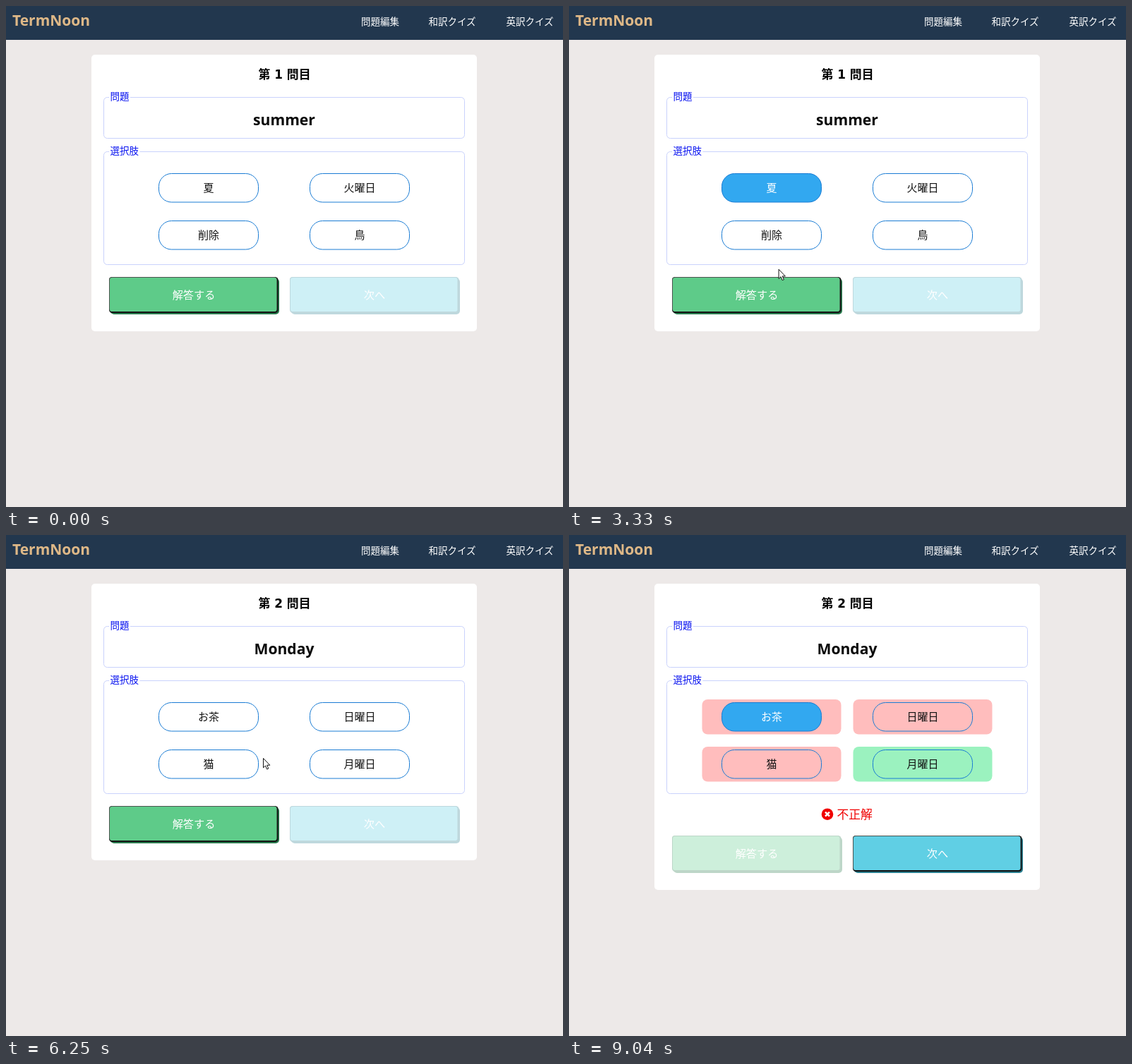
An HTML page that plays this animation: 789x710 px, repeating every 9.51 s.

```html
<!DOCTYPE html>
<html lang="ja">
<head>
<meta charset="utf-8">
<title>Quiz</title>
<style>
html, body { margin: 0; width: 100%; height: 100%; overflow: hidden; background: #ede9e8; }
svg { display: block; }
text { font-family: "Noto Sans CJK JP", "Noto Sans CJK", "Noto Sans", sans-serif; }
.mid { text-anchor: middle; }
.latin { font-family: "Noto Sans", "Open Sans", sans-serif; font-weight: 700; }
.head { font-family: "DejaVu Sans", "Noto Sans CJK JP", "Noto Sans CJK", sans-serif; font-weight: 700; }
.ink { fill: #fff; stroke: #111; stroke-linejoin: round; }
</style>
</head>
<body>
<svg id="stage" width="789" height="710" viewBox="0 0 789 710"></svg>
<script>
const LOOP = 9510;
const stage = document.getElementById('stage');

function el(parent, tag, attrs = {}, text) {
  const node = document.createElementNS('http://www.w3.org/2000/svg', tag);
  set(node, attrs);
  if (text) node.textContent = text;
  return parent.appendChild(node);
}
function set(node, attrs) {
  for (const key in attrs) node.setAttribute(key, attrs[key]);
}
function rect(parent, x, y, width, height, rx, fill, stroke = 'none') {
  return el(parent, 'rect', { x, y, width, height, rx, fill, stroke });
}
function label(parent, x, y, size, fill, text, cls = '') {
  return el(parent, 'text', { x, y, 'font-size': size, fill, class: cls }, text);
}
function show(node, on) {
  node.setAttribute('display', on ? 'inline' : 'none');
}
const clamp = v => Math.max(0, Math.min(1, v));
const ease = u => u * u * (3 - 2 * u);

// Page frame
rect(stage, 0, 0, 789, 48, 0, '#22374e');
label(stage, 9, 28, 21, '#deb887', 'TermNoon', 'latin');
label(stage, 503, 27, 13.5, '#fff', '問題編集');
label(stage, 598.5, 27, 13.5, '#fff', '和訳クイズ');
label(stage, 708.5, 27, 13.5, '#fff', '英訳クイズ');

const card = rect(stage, 121, 69, 546, 392, 5, '#fff');
const heading = label(stage, 394.5, 103.4, 16.9, '#000', '', 'head mid');

function fieldset(y, height, legend) {
  rect(stage, 138.5, y + 0.5, 511, height, 5, 'none', '#c9d2fc');
  rect(stage, 146, y - 1, legend.length * 13.5 + 3, 3, 0, '#fff');
  label(stage, 147.5, y + 4, 13.5, '#0a14f0', legend);
}
fieldset(129, 58, '問題');
fieldset(206, 160, '選択肢');
const word = label(stage, 394, 169, 21.1, '#0a0a0a', '', 'latin mid');

// Options, drawn around their own centres
const options = [0, 1, 2, 3].map(i => {
  const group = el(stage, 'g');
  return {
    x: 287 + 214 * (i % 2),
    y: 257.5 + 67 * (i >> 1),
    group,
    box: rect(group, -98.5, -24.5, 197, 49.5, 8),
    pill: rect(group, -70.5, -20, 141, 40.5, 18, 'none', '#1a7cd4'),
    text: label(group, 0, 5.1, 15, '#111', '', 'mid')
  };
});

// Result messages
function message(color, text, x, mark) {
  const group = el(stage, 'g');
  el(group, 'circle', { cx: 366, cy: 395.7, r: 8.3, fill: color });
  el(group, 'path', { d: mark, fill: 'none', stroke: '#fff', 'stroke-width': 2.5 });
  label(group, x, 401.5, 16.8, color, text);
  return group;
}
const right = message('#008000', '正解!!!', 378.5, 'M361.3 396l3.3 3.3 6.2-6.2');
const wrong = message('#f00000', '不正解', 379.5, 'M363 392.7l6 6m0-6l-6 6');

// Bevelled buttons
function button(x, text, fill, shade) {
  const group = el(stage, 'g');
  rect(group, -118.5, -24, 239, 51, 5, shade);
  const edge = rect(group, -120.5, -26, 239.5, 51, 4.5);
  const light = rect(group, -120.5, -26, 237.5, 49, 4);
  rect(group, -119.5, -25, 236.5, 48, 3, fill);
  label(group, -0.5, 4.7, 15.2, '#fff', text, 'mid');
  return { x, group, edge, light, shade };
}
const answerBtn = button(266.5, '解答する', '#5ecb89', '#287a4d');
const nextBtn = button(522.5, '次へ', '#60cfe4', '#2a7f90');

function drawButton(b, y, enabled, p) {
  const hover = enabled && Math.abs(p.x - b.x) < 120 && Math.abs(p.y - y) < 26;
  b.edge.setAttribute('fill', enabled ? '#111' : b.shade);
  b.light.setAttribute('fill', enabled ? '#4c5450' : b.shade);
  set(b.group, {
    opacity: enabled ? 1 : 0.3,
    transform: `translate(${b.x} ${y}) scale(${hover ? 0.96 : 1})`
  });
}

// Pointers, with the hot spot at the origin
const arrow = el(stage, 'path', {
  class: 'ink', d: 'M.5.5V13.8L3.5 11 5.6 15.9 7.8 15 5.7 10.2H9.8Z'
});
const hand = el(stage, 'path', {
  class: 'ink',
  d: 'M-1.5 12V1.5Q0-1 1.5 1.5V10 7Q3 5.6 4.5 7.3V10 7.3Q6 6.2 7.2 8V11 8Q9.5 7.4 9.5 9.8V14L7.5 18.5V20.5H-1.5V18.5L-6 12.5Q-6-10 -6 12.5Q-6.8 10.5-5 10.2Z'
    .replace('Q-6-10 -6 12.5', '')
});

// Pointer moves: start, end, then the place it comes to rest
const ENTER = 310, EXIT = 8540;
const moves = [
  [ENTER, 1230, 309, 266],
  [1560, 1850, 485, 262],
  [1850, 2110, 505, 305],
  [2110, 2450, 333, 265],
  [2950, 3500, 286, 404],
  [4080, 4580, 478, 448],
  [5280, 6050, 364, 316],
  [6270, 6650, 337, 267],
  [7210, 7840, 338, 417],
  [7840, EXIT, 738, 712]
];

function pointer(t) {
  const p = { x: 711, y: 652 };
  for (const [start, end, x, y] of moves) {
    const u = ease(clamp((t - start) / (end - start)));
    p.x += (x - p.x) * u;
    p.y += (y - p.y) * u;
  }
  return p;
}

// Two swings: squashed on the way down, lifted on the way up
function bounce(age) {
  const swing = 530;
  const wave = age > 0 && age < 2 * swing ? Math.sin(2 * Math.PI * age / swing) : 0;
  const down = Math.max(0, wave);
  return { drop: wave * (wave > 0 ? 4.5 : 8), squash: 1 - 0.085 * down, narrow: 1 - 0.008 * down };
}

const NEXT_AT = 4720;
const rounds = [
  { title: '第 1 問目', word: 'summer', names: ['夏', '火曜日', '削除', '鳥'],
    correct: 0, pickAt: 2780, answerAt: 3680 },
  { title: '第 2 問目', word: 'Monday', names: ['お茶', '日曜日', '猫', '月曜日'],
    correct: 3, pickAt: 6860, answerAt: 7680 }
];

function render(t) {
  const q = rounds[t < NEXT_AT ? 0 : 1];
  const p = pointer(t);
  const age = t - q.answerAt;
  const answered = age >= 0;
  const shift = answered ? 42 : 0;

  heading.textContent = q.title;
  word.textContent = q.word;
  card.setAttribute('height', 392 + shift);

  let overPill = false;
  options.forEach((o, i) => {
    const chosen = t >= q.pickAt && i === 0;
    const good = i === q.correct;
    const b = bounce(good ? age : 0);
    set(o.group, { transform: `translate(${o.x} ${o.y + b.drop}) scale(${b.narrow} ${b.squash})` });
    show(o.box, answered);
    o.box.setAttribute('fill', good ? '#9bf2bf' : '#ffbdbd');
    o.pill.setAttribute('fill', chosen ? '#32a8f0' : 'none');
    o.text.setAttribute('fill', chosen ? '#fff' : '#111');
    o.text.textContent = q.names[i];
    if (Math.abs(p.x - o.x) < 71 && Math.abs(p.y - o.y) < 21) overPill = true;
  });

  const fade = clamp(age / 600);
  set(right, { opacity: q.correct === 0 ? fade : 0 });
  set(wrong, { opacity: q.correct === 0 ? 0 : fade });

  drawButton(answerBtn, 410 + shift, !answered, p);
  drawButton(nextBtn, 410 + shift, answered, p);

  const visible = t >= ENTER && t < EXIT;
  show(arrow, visible && !overPill);
  show(hand, visible && overPill);
  for (const node of [arrow, hand]) set(node, { transform: `translate(${p.x} ${p.y})` });
}

const start = performance.now();
function tick() {
  render((performance.now() - start) % LOOP);
  requestAnimationFrame(tick);
}
tick();
</script>
</body>
</html>
```
